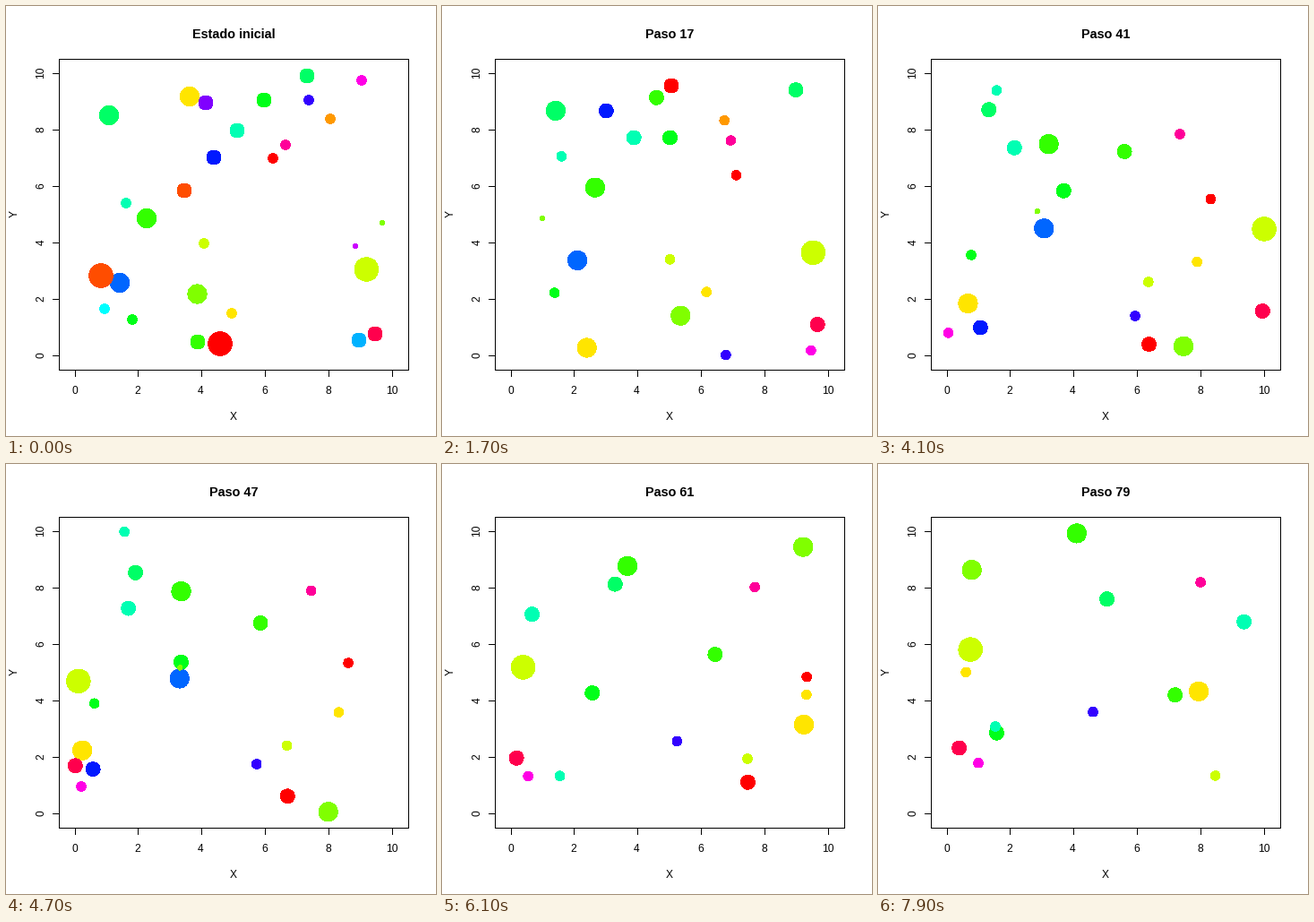
A matplotlib script for the animation above (8000 ms loop, 480 px wide and 480 px high).

```python
import colorsys

import matplotlib.pyplot as plt
import numpy as np
from matplotlib.animation import FuncAnimation

SIZE, DPI = 480, 72          # at 72 dpi one point is one pixel
STEPS, STEP_MS = 80, 100
LOW = np.array([76.9, 75.0])     # world edges in pixels; the world wraps around
SPAN = np.array([354.5, 315.5])

plt.rcParams["font.family"] = "Liberation Sans"

# Mass, start and velocity in pixels per step, in drawing order.
# Dots without a velocity drift at random and soon vanish.
DOTS = [
    (2, 298, 170, 1.79, 1.11), (3, 199, 206), (2, 362, 126, -2.75, 0.1),
    (4, 205, 101, -2.55, -2.06), (5, 402.4, 294, 0.7, -1.1),
    (4, 213.5, 321.5, 3.11, 1.42), (4, 157, 237, 0.82, -2.02),
    (3, 288, 105, -1.97, 2.47), (4, 115, 122, 0.7, -0.3),
    (3, 258, 139, -2.58, 0.47), (2, 110, 338), (3, 394, 373),
    (4, 127, 309, 1.42, -1.48), (3, 232, 169, -2.87, -3.06),
    (2, 338, 105, -1.24, -1.82), (3, 223, 108, 1.94, -1.12), (1, 390, 268),
    (2, 397, 83, 0.88, -0.82), (2, 312, 155, 0.61, -0.29),
    (3, 412, 366, 0.42, -0.62), (5, 239, 377), (5, 106, 301, -2.95, -1),
    (2, 252, 343, 2.54, -1.4), (2, 221, 265, 1.97, 1.05),
    (1, 420, 242, 2.74, -0.31), (3, 214, 375, 1.49, 2.51),
    (2, 141, 350, -0.9, -1.76), (3, 336, 78, 3.47, 0.92),
    (2, 134, 220, -0.04, -3.07),
]
# Collisions: step and the dots it removes.
REMOVED = {13: [21], 33: [2, 8], 48: [12, 13, 24], 56: [26], 65: [0], 72: [15]}
RECOLORED, RECOLOR_STEP = 15, 8

rng = np.random.default_rng(4)
start = np.array([dot[1:3] for dot in DOTS], float)
radius = np.array([2.65 * dot[0] for dot in DOTS])
velocity = np.array([dot[3:] or rng.uniform(-1, 1, 2) for dot in DOTS])
end = np.array([STEPS if dot[3:] else rng.integers(3, 10) for dot in DOTS])
for step, gone in REMOVED.items():
    end[gone] = step

# Twenty rainbow hues, started again after the twentieth; one dot is missing.
hues = [i % 20 for i in range(30) if i != 22]
COLORS = np.array([colorsys.hsv_to_rgb(h / 20, 1, 1) for h in hues])


fig = plt.figure(figsize=(SIZE / DPI, SIZE / DPI), dpi=DPI, facecolor="white")
ax = fig.add_axes([0, 0, 1, 1])
ax.set_xlim(0, SIZE)
ax.set_ylim(SIZE, 0)
ax.axis("off")


def line(xs, ys):
    ax.plot(xs, ys, color="black", lw=1, antialiased=False,
            solid_capstyle="projecting", zorder=1)


def label(x, y, text, rotation=0, size=12, **kw):
    return ax.text(x, y, text, fontsize=size, rotation=rotation,
                   rotation_mode="anchor", ha="center", va="baseline", **kw)


line([59, 449, 449, 59, 59], [59, 59, 406, 406, 59])
for k in range(6):
    x = 77 + int(70.9 * k)
    y = 390 - 63 * k
    line([x, x], [406, 413])
    line([52, 59], [y, y])
    label(x - 0.5, 433, str(2 * k))
    label(42.5, y - 0.5, str(2 * k), rotation=90)
label(253.5, 462, "X")
label(12.5, 232, "Y", rotation=90)
title = label(254, 36, "", size=14.4, fontweight="bold")

dots = ax.scatter([], [], linewidths=0, antialiased=False, zorder=2)


def draw(step):
    alive = end > step
    place = LOW + (start + velocity * step - LOW) % SPAN
    colors = COLORS.copy()
    if step >= RECOLOR_STEP:
        colors[RECOLORED] = (1, 0, 0)
    dots.set_offsets(place[alive])
    dots.set_sizes((2 * radius[alive]) ** 2)
    dots.set_facecolors(colors[alive])
    title.set_text(f"Paso {step}" if step else "Estado inicial")
    return dots, title


anim = FuncAnimation(fig, draw, frames=STEPS, interval=STEP_MS,
                     repeat=True, repeat_delay=0, blit=False)
plt.show()
```
